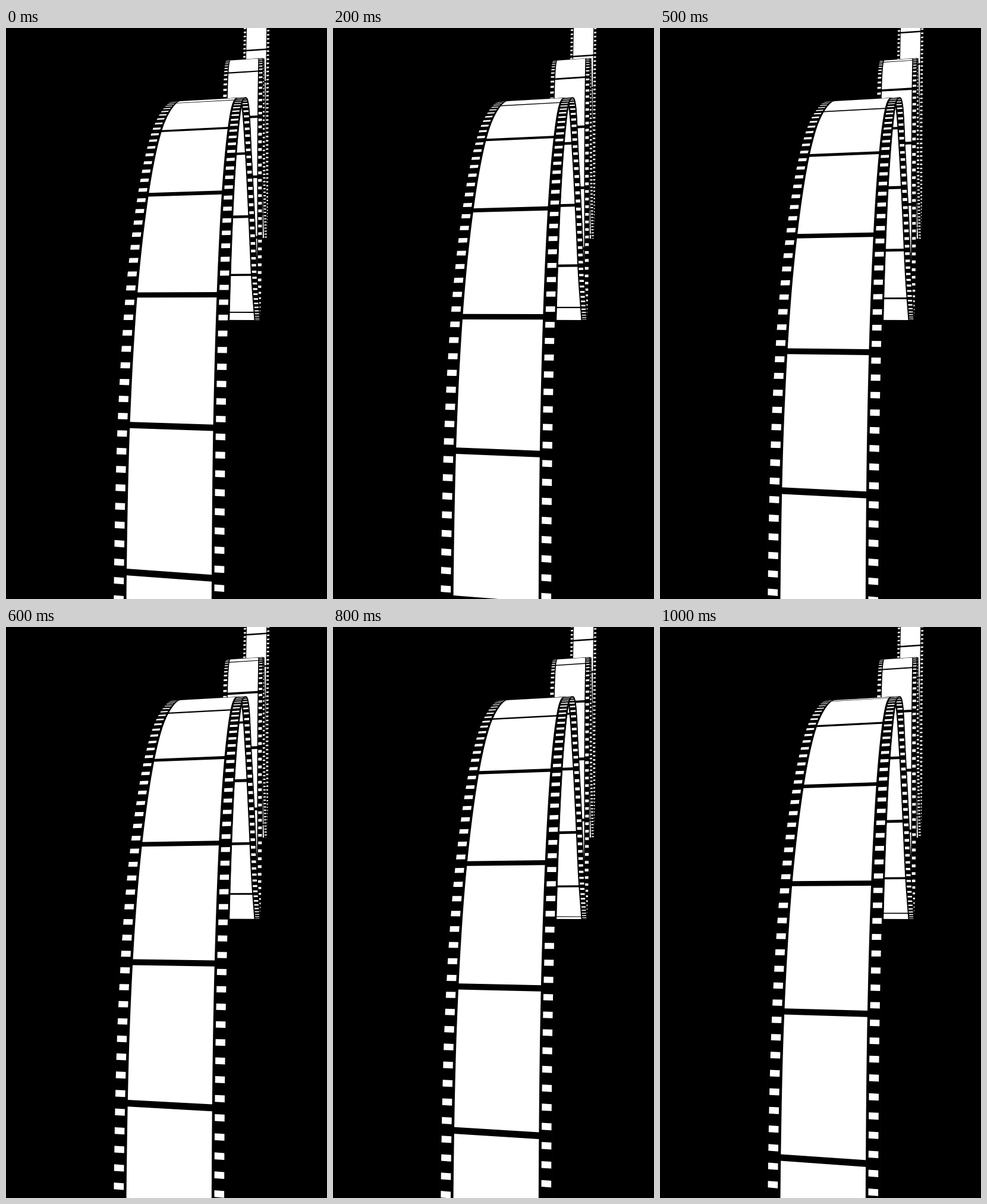
Recreate the animation shown at these times as an HTML page with a canvas. Size 540x960 px, loop 1.1 s.

```html
<!DOCTYPE html>
<html lang="en">
<head>
<meta charset="utf-8">
<title>Film strip</title>
<style>
  html, body { margin: 0; width: 100%; height: 100%; overflow: hidden; background: #000; }
  canvas { display: block; }
</style>
</head>
<body>
<canvas width="540" height="960"></canvas>
<script>
const ctx = document.querySelector('canvas').getContext('2d');

const GAP = .0225;      // half of a divider, also half of a hole
const EDGE = .168;      // perforated border, relative to the picture width
const HOLE = [.032, .148];
const HOLES = 8;        // per picture
const STEPS = 11;       // per loop
const HORIZON = 470;

// A stretch of ribbon. Each knot gives the right edge (x, y) and the width of the picture area;
// inner knots are evenly spaced along the film, the outer two lie at start and end.
function stretch(start, end, gap, ...knots) {
  const last = knots.length - 1;
  return knots.map((k, i) => [i === 0 ? start : i === last ? end : i * gap, ...k]);
}

// Back to front
const ribbon = [
  stretch(0, 7.3, 3, [438.5, -19.5, 33], [436.5, 144.5, 34], [435.5, 304, 34], [433.5, 354, 34]),
  stretch(0, 6.2, 2.5, [434, 354, 34], [431.2, 243, 34], [429, 105, 36], [427, 52, 43]),
  stretch(.05, 5.9, 1, [424.5, 51.5, 46.5], [424, 72.5, 49.7], [423, 149, 51],
    [422.5, 250, 52], [422.5, 352, 53], [421, 450, 54], [418, 491, 58]),
  stretch(.55, 5.6, 1, [417.5, 491, 60], [416.5, 478, 61], [412, 415, 64],
    [407.5, 317, 66], [402, 211, 66], [395.5, 130, 77], [389, 117.8, 89]),
  stretch(.64, 7, 1, [388, 117.8, 94], [383.5, 121, 96.5], [373, 168, 111], [363, 276.5, 123],
    [354.5, 448.5, 133.5], [348.5, 672, 140], [346, 925, 143], [346, 1178, 143.5])
];

const secant = (k, i, c) => (k[i + 1][c] - k[i][c]) / (k[i + 1][0] - k[i][0]);

function slope(k, i, c) {
  const last = k.length - 1;
  if (i === 0) return 2 * secant(k, 0, c) - slope(k, 1, c);
  if (i === last) return 2 * secant(k, last - 1, c) - slope(k, last - 1, c);
  const before = k[i][0] - k[i - 1][0], after = k[i + 1][0] - k[i][0];
  return (secant(k, i - 1, c) * after + secant(k, i, c) * before) / (before + after);
}

// Cubic Hermite interpolation of x, y and width at film position u
function rowAt(k, u) {
  let i = 0;
  while (i < k.length - 2 && u > k[i + 1][0]) i++;
  const h = k[i + 1][0] - k[i][0], s = (u - k[i][0]) / h, r = 1 - s;
  return [1, 2, 3].map(c =>
    k[i][c] * (1 + 2 * s) * r * r + k[i + 1][c] * (3 - 2 * s) * s * s +
    h * s * r * (slope(k, i, c) * r - slope(k, i + 1, c) * s));
}

// Traces the ribbon from u = a to b and from side to side (0 to 1 is the picture)
function patch(k, a, b, from, to) {
  a = Math.max(a, k[0][0]);
  b = Math.min(b, k[k.length - 1][0]);
  ctx.beginPath();
  if (a >= b) return;
  const n = Math.ceil((b - a) * 16), rows = [];
  for (let i = 0; i <= n; i++) rows.push(rowAt(k, a + (b - a) * i / n));
  const add = side => ([x, y, width]) => {
    const left = width * (1 - side);
    ctx.lineTo(x - left, y + left * (HORIZON - y) * .00016);
  };
  rows.forEach(add(from));
  rows.reverse().forEach(add(to));
  ctx.closePath();
}

function drawStretch(k, phase) {
  const start = k[0][0], end = k[k.length - 1][0];
  patch(k, start, end, -EDGE, 1 + EDGE);
  ctx.strokeStyle = '#0a0a0a';
  ctx.stroke();
  ctx.fillStyle = '#000';
  ctx.fill();
  ctx.fillStyle = '#fff';
  for (let u = Math.floor(start) - 1 + phase; u < end; u++) {
    patch(k, u + GAP, u + 1 - GAP, 0, 1);
    ctx.fill();
    for (let i = 0; i < HOLES; i++) {
      const mid = u + (i + .5) / HOLES;
      patch(k, mid - GAP, mid + GAP, -HOLE[1], -HOLE[0]);
      ctx.fill();
      patch(k, mid - GAP, mid + GAP, 1 + HOLE[0], 1 + HOLE[1]);
      ctx.fill();
    }
  }
}

function draw() {
  const step = Math.floor(performance.now() / 100) % STEPS;
  ctx.fillStyle = '#000';
  ctx.fillRect(0, 0, 540, 960);
  ribbon.forEach(k => drawStretch(k, step / STEPS));
  requestAnimationFrame(draw);
}
draw();
</script>
</body>
</html>
```
